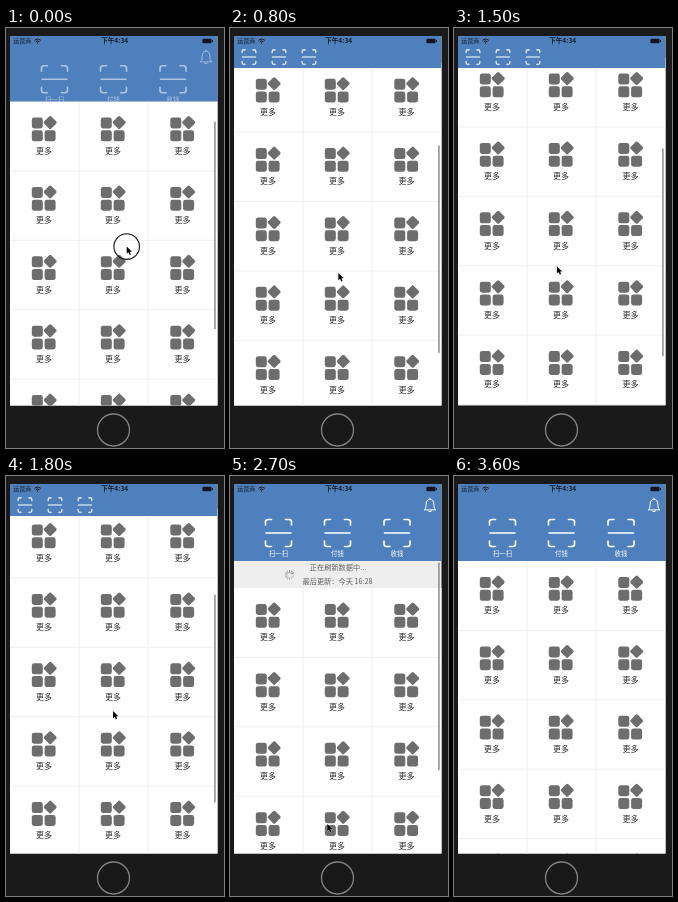
Animation of 218 by 420 pixels, one loop 3800 ms. Source, as an HTML page:

```html
<!DOCTYPE html>
<html lang="zh-CN">
<head>
<meta charset="utf-8">
<title>下拉刷新</title>
<style>
html, body { margin: 0; width: 100%; height: 100%; overflow: hidden; background: #1a1a1a; }
svg { display: block; width: 218px; height: 420px; }
text { font-family: "Noto Sans CJK SC", "Noto Sans CJK", "Noto Sans", sans-serif; text-anchor: middle; }
.line { fill: none; stroke: #fff; stroke-linecap: round; stroke-linejoin: round; }
.cell text { font-size: 8px; fill: #2c2c2c; }
.cell rect { fill: #6d6d6d; }
.rule { stroke: #efefef; }
.label { font-size: 6.4px; fill: #fff; }
.hint text { font-size: 7.2px; fill: #5c5c5c; }
</style>
</head>
<body>
<svg viewBox="0 0 218 420">
  <defs>
    <clipPath id="screen"><rect x="4" y="8" width="207.5" height="369.5"/></clipPath>
    <clipPath id="top"><rect id="topClip" x="4" y="8" width="207.5" height="77"/></clipPath>
    <g id="cell" class="cell">
      <rect x="-12.2" y="16" width="11" height="11" rx="2.4"/>
      <rect x="-12.2" y="28.8" width="11" height="11" rx="2.4"/>
      <rect x="0.6" y="28.8" width="11" height="11" rx="2.4"/>
      <rect x="-5" y="-5" width="10" height="10" rx="1.6" transform="translate(6.2 21) rotate(45)"/>
      <text y="52.4">更多</text>
    </g>
    <path id="scan" d="M-13-8v-3q0-2.5 2.5-2.5h3.5M7-13.5h3.5q2.5 0 2.5 2.5v3M13 8v3q0 2.5-2.5 2.5h-3.5M-7 13.5h-3.5q-2.5 0-2.5-2.5v-3M-12.5 0h25"/>
  </defs>

  <rect width="218" height="420" fill="#1a1a1a"/>
  <circle cx="107.5" cy="402" r="16" fill="#181818" stroke="#858585" stroke-width="1.3"/>

  <g clip-path="url(#screen)">
    <rect x="4" y="8" width="208" height="370" fill="#eeeeee"/>
    <g id="list">
      <g class="hint">
        <text id="state" x="108" y="-17.6"></text>
        <text x="107.5" y="-4.4">最后更新：今天 16:28</text>
        <g transform="translate(59.5 -13)">
          <path id="arrow" d="M0-7v12.5M-3.2 2.5L0 5.7L3.2 2.5" fill="none" stroke="#666" stroke-width="1"/>
          <g id="spinner" stroke="#777" stroke-width="1" stroke-linecap="round"></g>
        </g>
      </g>
      <rect x="4" width="208" height="347" fill="#fff"/>
      <g id="grid"></g>
    </g>

    <g clip-path="url(#top)">
      <rect x="4" y="8" width="208" height="77" fill="#4f80be"/>
      <g id="big"></g>
      <g id="small" class="line"></g>
      <path id="bell" class="line" stroke-width="1" d="M200 22.2v1M194.6 33.6c1.6-1.4 1.4-3.4 1.5-5.4c.2-3.2 1.8-5 3.9-5s3.7 1.8 3.9 5c.1 2-.1 4 1.5 5.4zM198.4 35q1.6 1.8 3.2 0"/>
      <text x="16.3" y="15.3" font-size="6.1" fill="#151b24">运营商</text>
      <g fill="none" stroke="#151b24" stroke-width="1">
        <path d="M28.4 12.3q3.2-2.8 6.4 0M29.8 13.7q1.8-1.5 3.6 0"/>
        <circle cx="31.6" cy="15" r=".4"/>
      </g>
      <text x="108.7" y="15.4" font-size="6.6" font-weight="700" fill="#151b24">下午4:34</text>
      <rect x="196.5" y="10.8" width="9" height="4.4" rx=".8" fill="#10151c"/>
      <rect x="206" y="12" width="1" height="2" fill="#10151c"/>
    </g>

    <rect id="thumb" x="208" width="1.8" rx=".9" fill="#7f7f7f" fill-opacity=".75"/>

    <g id="pointer">
      <circle id="ring" r="12.8" fill="none" stroke="#111" stroke-width="1.1"/>
      <path d="M0 0v7.2l1.7-1.5l1.2 2.7l1.3-.6l-1.2-2.6h2.3z" fill="#000" stroke="#fff" stroke-width=".6" paint-order="stroke"/>
    </g>
  </g>
</svg>
<script>
const $ = id => document.getElementById(id);
const clamp = (v, lo = 0, hi = 1) => Math.min(hi, Math.max(lo, v));
const LOOP = 3800, STEP = 100, LAST = 3600;
const TOP = 85, BAR = 40, ROW = 69.4, THUMB = 208;
const COLS = [38, 107, 176.5];

// Static repeated parts
let grid = '';
for (let r = 0; r < 5; r++) {
  for (const x of COLS) grid += `<use href="#cell" x="${x}" y="${r * ROW}"/>`;
  grid += `<path class="rule" d="M4 ${(r + 1) * ROW}h208"/>`;
}
$('grid').innerHTML = grid + '<path class="rule" d="M73 0v347M142 0v347"/>';

$('big').innerHTML = ['扫一扫', '付钱', '收钱'].map((name, i) => {
  const x = [48.5, 107.5, 167][i];
  return `<use href="#scan" class="line" stroke-width="1.6" x="${x}" y="57"/>
    <text class="label" x="${x}" y="79.5">${name}</text>`;
}).join('');

$('small').innerHTML = [19, 49, 79].map(x =>
  `<use href="#scan" stroke-width="2" transform="translate(${x} 29) scale(.53)"/>`).join('');

$('spinner').innerHTML = Array.from({ length: 12 }, (_, i) =>
  `<path d="M0-2.6v-2" transform="rotate(${i * 30})" opacity="${0.25 + i * 0.055}"/>`).join('');

// Motion: [time, value...]
const scroll = [[0, 11.5], [400, 32], [600, 43], [900, 54], [1200, 81.5], [1300, 70], [1400, 60],
  [1500, 55.5], [1600, 54.5], [1800, 52.5], [2300, -15], [2600, -35], [2700, -27], [3200, -27],
  [3300, -12], [3400, -3], [3500, 0]];
const hand = [[0, 120.7, 218.6], [400, 119.4, 201.8], [600, 117, 191], [900, 104, 272],
  [1200, 98.8, 241.5], [1800, 107, 235], [2300, 86, 304.6], [2600, 96, 346], [2700, 97.3, 348],
  [3000, 100, 356]];
const touches = [[0, 600], [900, 1200], [1900, 2500]];

function at(keys, t) {
  const i = keys.findIndex(k => k[0] > t);
  if (i < 0) return keys[keys.length - 1].slice(1);
  const a = keys[i - 1], b = keys[i];
  const p = (t - a[0]) / (b[0] - a[0]);
  return a.slice(1).map((v, n) => v + (b[n + 1] - v) * p);
}

function draw(t) {
  const [s] = at(scroll, t);
  const [x, y] = at(hand, t);
  const up = Math.max(0, s);
  const loading = t >= 2600 && t < 3200;
  const ready = s < -27 && !loading;

  $('list').setAttribute('transform', `translate(0 ${TOP - s})`);
  $('topClip').setAttribute('height', Math.max(BAR, TOP - up) - 8);
  $('big').setAttribute('transform', `translate(0 ${-up / 2})`);
  $('big').setAttribute('opacity', clamp(1 - up / 25));
  $('bell').setAttribute('opacity', clamp(1 - up / 20));
  $('small').setAttribute('opacity', clamp((up - 18) / 14));

  $('state').textContent = loading ? '正在刷新数据中...' : ready ? '松开立即刷新' : '下拉可以刷新';
  $('arrow').setAttribute('visibility', loading ? 'hidden' : 'visible');
  $('arrow').setAttribute('transform', `rotate(${ready ? 180 : 0})`);
  $('spinner').setAttribute('visibility', loading ? 'visible' : 'hidden');
  $('spinner').setAttribute('transform', `rotate(${t / STEP * 30})`);

  $('thumb').setAttribute('y', 86.5 + 0.61 * up);
  $('thumb').setAttribute('height', THUMB + (loading ? 0 : Math.min(0, s)));
  $('thumb').setAttribute('opacity', clamp((3300 - t) / 300));

  $('pointer').setAttribute('transform', `translate(${x} ${y})`);
  $('pointer').setAttribute('visibility', t < 3000 ? 'visible' : 'hidden');
  $('ring').setAttribute('opacity', touches.some(([a, b]) => t >= a && t <= b) ? 1 : 0);
}

const start = performance.now();
function tick() {
  const t = (performance.now() - start) % LOOP;
  draw(Math.min(LAST, Math.floor(t / STEP) * STEP));
  requestAnimationFrame(tick);
}
tick();
</script>
</body>
</html>
```
